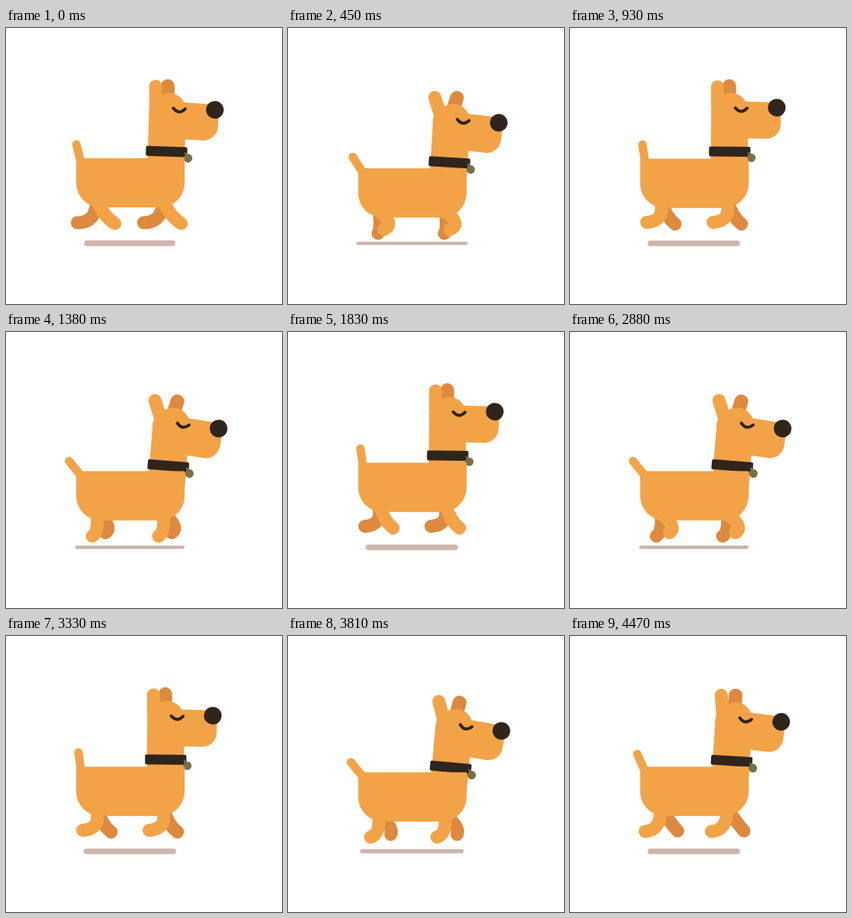
Write an HTML page with a canvas that moves like this. It is 360 px wide and 360 px high and loops after 4500 ms.

```html
<!DOCTYPE html>
<html lang="en">
<head>
<meta charset="utf-8">
<title>Walking dog</title>
<style>
  html, body { margin: 0; width: 100%; height: 100%; overflow: hidden; background: #fff; }
  canvas { display: block; width: 100vmin; height: 100vmin; }
</style>
</head>
<body>
<canvas width="360" height="360"></canvas>
<script>
const ctx = document.querySelector('canvas').getContext('2d');
const LOOP = 4500, STEP = 30, STRIDE = 600, BOB = STRIDE / 2;
const COAT = '#f3a347', SHADE = '#dd893f', DARK = '#30251c';
const RAD = Math.PI / 180;

// Smooth 0..1..0 swing once per bob, at zero when t equals start
const swing = (t, start) => (1 - Math.cos((t - start) / BOB * 2 * Math.PI)) / 2;

function rotateAt(x, y, degrees) {
  ctx.translate(x, y);
  ctx.rotate(degrees * RAD);
  ctx.translate(-x, -y);
}

function fill(color, build) {
  ctx.fillStyle = color;
  ctx.beginPath();
  build();
  ctx.fill();
}

function stroke(color, width, build) {
  ctx.strokeStyle = color;
  ctx.lineWidth = width;
  ctx.beginPath();
  build();
  ctx.stroke();
}

const disc = (color, x, y, r) => fill(color, () => ctx.arc(x, y, r, 0, 2 * Math.PI));
const box = (color, x, y, w, h, r) => fill(color, () => ctx.roundRect(x, y, w, h, r));

// A bar from its root, tilted from upright
function bar(color, width, x, y, length, degrees) {
  stroke(color, width, () => {
    ctx.moveTo(x, y);
    ctx.lineTo(x + length * Math.sin(degrees * RAD), y - length * Math.cos(degrees * RAD));
  });
}

// Feet slide back evenly, then lift and swing forward with a bent knee
function legs(color, t) {
  const u = t % STRIDE / BOB;
  const s = u < 1 ? 1 - 2 * u : 1 - 2 * Math.pow(2 - u, 1.5);
  const lift = u < 1 ? 0 : 5 * Math.sin((u - 1) * Math.PI);
  for (const x of [117.5, 204]) {
    stroke(color, 17, () => {
      ctx.moveTo(x + 1.5 + s, 226);
      ctx.quadraticCurveTo(x + 4 + 4 * s + 3.5 * lift, 249 - 5 * s - lift, x + 24.5 * s, 254.5 + 0.5 * s - lift);
    });
  }
}

function head(t, nod) {
  const flap = 18 * swing(t, 20), neckTurn = 5.2 * nod, headTurn = 5 * nod;
  const level = -neckTurn - headTurn;

  ctx.save();
  rotateAt(175, 210, neckTurn);

  ctx.save();
  rotateAt(208, 114, headTurn);
  bar(SHADE, 18, 206.3, 98, 23.3, level + flap);
  ctx.restore();

  box(COAT, 183.2, 104, 48.3, 94, 0);

  ctx.save();
  rotateAt(208, 114, headTurn);
  bar(COAT, 17, 191.2, 99, 23, level - flap);
  disc(COAT, 209, 105, 21.5);
  box(COAT, 183.2, 98, 40, 14, 0);
  box(COAT, 205, 94.5, 69, 48, [0, 0, 19, 0]);
  disc(DARK, 268.5, 101.5, 11.5);
  stroke(DARK, 4, () => {
    ctx.moveTo(214.3, 103);
    ctx.quadraticCurveTo(222, 111.5, 229.8, 103);
  });
  ctx.restore();

  box(DARK, 180.8, 153.5, 54, 13, 2);
  stroke('#8f8a78', 1.5, () => {
    ctx.moveTo(232, 161);
    ctx.lineTo(235, 165);
  });
  disc('#79704a', 236, 167.8, 5.6);
  ctx.restore();
}

function draw(t) {
  const drop = 13.3 * Math.pow(swing(t, 0), 1.2);
  ctx.clearRect(0, 0, 360, 360);
  ctx.lineCap = 'round';

  const half = 59.5 + drop, thick = 7.5 - drop / 4;
  box('#cfb5ae', 161.5 - half, 280.8 - thick / 2, 2 * half, thick, thick / 2);

  ctx.save();
  ctx.translate(0, drop);
  legs(SHADE, t + BOB);
  bar(COAT, 11, 98, 176, 25, -7 - 33 * swing(t, 47));
  head(t, swing(t, 63));
  box(COAT, 91.5, 169.8, 141.5, 64.2, [2, 0, 32, 32]);
  legs(COAT, t);
  ctx.restore();
}

function tick() {
  draw(Math.floor(performance.now() % LOOP / STEP) * STEP);
  requestAnimationFrame(tick);
}
tick();
</script>
</body>
</html>
```
